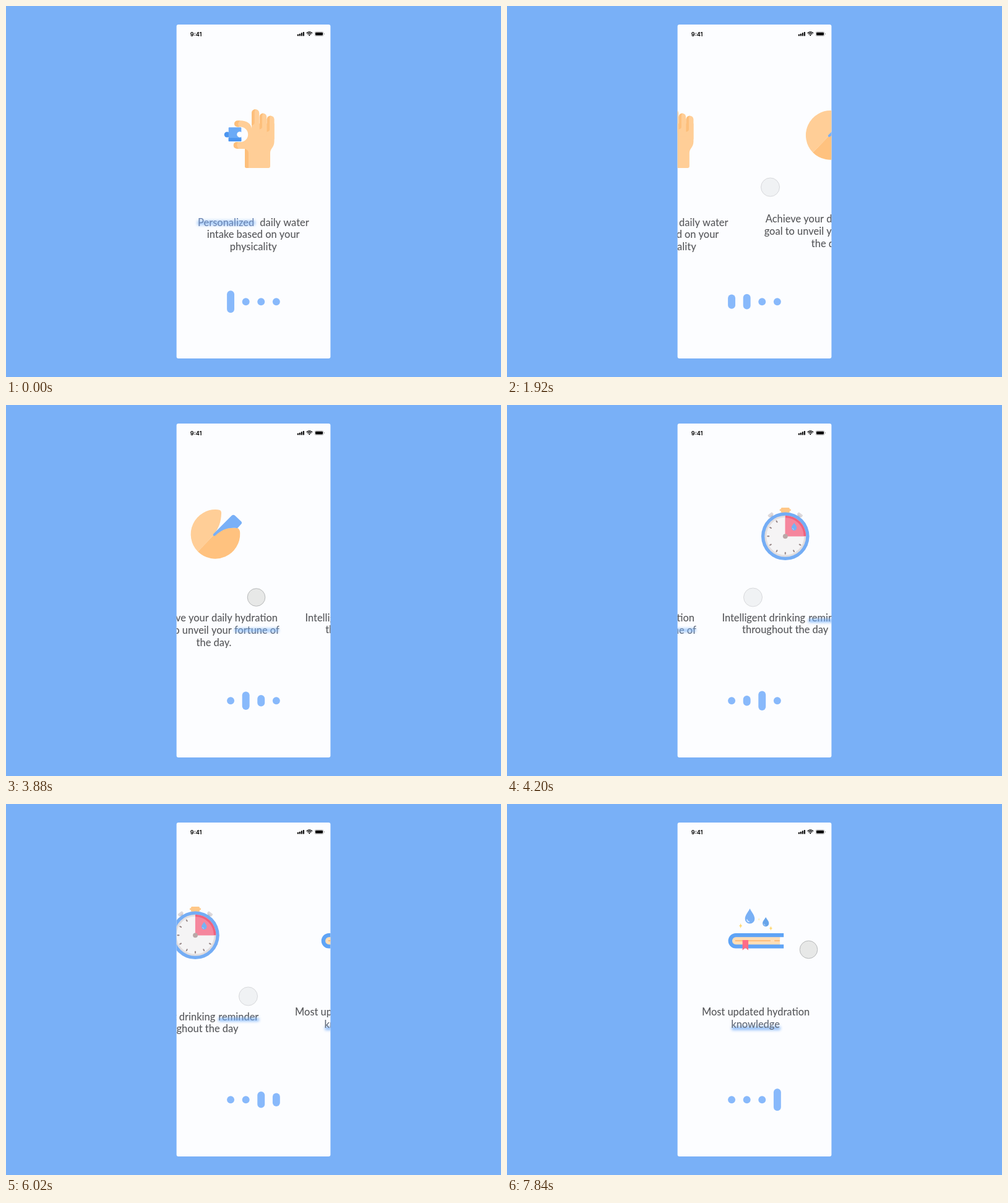
An HTML page with a canvas for the animation above (8000 ms loop, 800x600 px).

```html
<!DOCTYPE html>
<html lang="en">
<head>
<meta charset="utf-8">
<title>Hydration onboarding</title>
<style>
html, body { margin: 0; width: 100%; height: 100%; overflow: hidden; background: #79b0f7; }
canvas { display: block; }
</style>
</head>
<body>
<canvas id="stage" width="800" height="600"></canvas>
<script>
const ctx = document.getElementById('stage').getContext('2d');
const LOOP = 8000, STEP = 249.5, SNAP_END = 820;
const LIGHT = '#ffce97', DARK = '#fdbf7b', BLUE = '#79b0f7';

const linear = p => p;
const easeOut = p => 1 - Math.pow(1 - p, 2.5);
const quadOut = p => p * (2 - p);
const easeInOut = p => (1 - Math.cos(Math.PI * p)) / 2;

// start, drag time, drag distance
const swipes = [[1600, 190, 62.5], [3700, 200, 74], [5800, 200, 86.5]];
const presses = [[1420, 1790], [3520, 3900], [5600, 6000], [7840, 8000]];

// time, x, y, easing towards this point
const route = [
  [400, 501, 14], [640, 501, 202.5, easeOut],
  [900, 501, 202.5], [1220, 488, 294, easeInOut],
  [1600, 488, 294], [1790, 425.5, 293, linear],
  [2420, 425.5, 293], [3040, 471.5, 311.5, easeOut],
  [3700, 471.5, 311.5], [3900, 397.5, 311, linear],
  [4520, 397.5, 311], [5180, 478, 311.5, easeOut],
  [5800, 478, 311.5], [6000, 391.5, 311, linear],
  [6720, 391.5, 311], [7300, 483, 222.5, easeInOut],
  [7540, 484.5, 232, easeInOut], [7660, 487.5, 235.5, quadOut]
];

function scrollAt(t) {
  let s = 0;
  for (const [start, drag, dist] of swipes) {
    const d = t - start;
    if (d <= 0) break;
    if (d < drag) s += dist * d / drag;
    else s += dist + (STEP - dist) * quadOut(Math.min(1, (d - drag) / (SNAP_END - drag)));
  }
  return s;
}

function cursorAt(t) {
  for (let i = 1; i < route.length; i++) {
    const [t1, x1, y1, ease = linear] = route[i];
    if (t < t1) {
      const [t0, x0, y0] = route[i - 1];
      const p = ease(Math.max(0, (t - t0) / (t1 - t0)));
      return [x0 + (x1 - x0) * p, y0 + (y1 - y0) * p];
    }
  }
  return route[route.length - 1].slice(1, 3);
}

function fill(d, color) {
  ctx.fillStyle = color;
  ctx.fill(new Path2D(d));
}

function box(x, y, w, h, r, color) {
  ctx.fillStyle = color;
  ctx.beginPath();
  ctx.roundRect(x, y, w, h, r);
  ctx.fill();
}

function disc(x, y, r, color) {
  ctx.fillStyle = color;
  ctx.beginPath();
  ctx.arc(x, y, r, 0, Math.PI * 2);
  ctx.fill();
}

function label(str, x, y, color = '#58595c') {
  ctx.font = '500 16.4px Lato, "Open Sans", sans-serif';
  ctx.textAlign = 'center';
  ctx.fillStyle = color;
  ctx.fillText(str, x, y);
}

function marker(x, y, w, h, alpha) {
  ctx.save();
  ctx.globalAlpha = alpha;
  ctx.filter = 'blur(2px)';
  box(x, y, w, h, 2, '#72adf8');
  ctx.restore();
}

function drop(x, top, w, h, color, shine) {
  const r = w / 2, cy = top + h - r;
  ctx.fillStyle = color;
  ctx.beginPath();
  ctx.moveTo(x, top);
  ctx.bezierCurveTo(x + r * .35, top + h * .25, x + r, cy - r * .8, x + r, cy);
  ctx.arc(x, cy, r, 0, Math.PI);
  ctx.bezierCurveTo(x - r, cy - r * .8, x - r * .35, top + h * .25, x, top);
  ctx.fill();
  ctx.strokeStyle = shine;
  ctx.lineWidth = w * .1;
  ctx.beginPath();
  ctx.arc(x, cy, r * .62, Math.PI * .55, Math.PI * .95);
  ctx.stroke();
}

function spark(x, y, r, color) {
  const k = r * .25;
  fill(`M${x} ${y - r}L${x + k} ${y - k}L${x + r * .7} ${y}L${x + k} ${y + k}L${x} ${y + r}` +
    `L${x - k} ${y + k}L${x - r * .7} ${y}L${x - k} ${y - k}Z`, color);
}

function hand() {
  fill('M397 190H433.6V219C433.6 229 427 230 427 238V259a3 3 0 0 1-3 3H389a3 3 0 0 1-3-3V231' +
    'C380 231.2 375 231 372 230.4a5.3 5.3 0 0 1 0-10.4H380A12.3 12.3 0 0 0 380 195.5H374' +
    'a5 5 0 0 1 0-10C387 184 396 189 397 198Z', LIGHT);
  for (const [x, y, w] of [[397, 167, 12.3], [409.8, 173.5, 11.4], [421.6, 177.5, 12]]) {
    const r = w / 2;
    box(x, y, w, 38, [r, r, 0, 0], LIGHT);
    fill(`M${x} ${y + r}a${r} ${r} 0 0 1 ${r} ${-r}q-1.5 2 -1.5 6V${y + 22}q0 3 ${1.5 - r} 4Z`, DARK);
  }
  fill('M374 195.5a5 5 0 0 1 0-10h4q-5 5-1 10Z', DARK);
  fill('M372 230.4a5.3 5.3 0 0 1 0-10.4h3q-4 5 1 11Z', DARK);
  fill('M386 231q6 1 6 8V262H389a3 3 0 0 1-3-3Z', DARK);
  disc(357.3, 208, 4.6, '#4b95f0');
  box(359.7, 196.3, 20.6, 22.8, 1.2, '#6baaf6');
  box(359.7, 213.6, 20.6, 5.5, [0, 0, 1.2, 1.2], '#4b95f0');
  disc(377.8, 207.8, 4.6, '#fcfdff');
}

function cookie() {
  fill('M377 237A40 40 0 0 1 409 169.2Q415.5 169.5 415 175C414.5 190 411 198 403 210Z', LIGHT);
  fill('M377 237L403 210C413 200 424 198 440 198.8Q445 199.5 445.2 207A40 40 0 0 1 377 237Z', '#ffc27f');
  fill('M402.2 208.4L431.8 178.8Q434.3 176.6 436.7 178.6L447 188.3Q449 190.4 447.2 192.5L441 199.2' +
    'C425 197.5 416 201.5 406 210.5Q403.5 212.8 402 211.2Q401 209.8 402.2 208.4Z', BLUE);
}

function timer() {
  const x = 403.3, y = 212.3;
  for (const side of [-1, 1]) {
    ctx.save();
    ctx.translate(x + side * 23, 178.5);
    ctx.rotate(side * .66);
    box(-4.5, -3.5, 9, 5, 1.2, '#dcd8db');
    box(-2.5, 0, 5, 6, 0, '#cfc9cd');
    ctx.restore();
  }
  box(399, 172, 9, 5, 0, '#f3b56f');
  box(396.3, 166, 14, 8, 1.5, '#ffc787');
  box(394.2, 168.4, 18.2, 2.8, 1, '#ffc787');
  disc(x, y, 38.8, '#74adf5');
  disc(x, y, 33.5, '#e2dedf');
  disc(x, y, 30.5, '#f5f4f5');
  for (const [r, c] of [[33.5, '#f0627e'], [30, '#f5869d']]) {
    ctx.fillStyle = c;
    ctx.beginPath();
    ctx.moveTo(x, y);
    ctx.arc(x, y, r, -Math.PI / 2, 0);
    ctx.fill();
  }
  for (let i = 4; i < 12; i++) {
    ctx.save();
    ctx.translate(x, y);
    ctx.rotate(i * Math.PI / 6);
    box(-1, -29.5, 2, 4, .8, '#978787');
    ctx.restore();
  }
  disc(x, y, 3.9, '#b9a8a8');
  drop(417.6, 190.5, 8.4, 12.5, '#76b2f4', '#c9e3ff');
}

function book() {
  drop(392.5, 169, 15.6, 24.6, '#79b0f5', '#dcecff');
  drop(418.2, 183, 10.2, 15.2, '#68a5ea', '#b5d5fb');
  spark(377.6, 197, 4, '#ffd873');
  spark(407.2, 186.5, 2.6, '#ffeebf');
  spark(426.4, 201, 3.8, '#ffd873');
  fill('M447.2 209H369.8a12.25 12.25 0 0 0 0 24.5H447.2V227.3H441V215.2H447.2Z', '#5fa4f6');
  fill('M441.5 215.2H370a6 6 0 0 0 0 12.1H441.5Q440 221 441.5 215.2Z', '#ffdeb7');
  box(368.5, 220, 57.5, 2.3, 1, '#ffc07d');
  box(432, 220, 9, 2.3, 1, '#ffc07d');
  fill('M380.6 220H390V236.4L385.3 232.6L380.6 236.4Z', '#ff6c87');
}

const pages = [
  () => {
    hand();
    marker(309, 346.8, 94, 8, .55);
    label('Personalized', 355.6, 355.5, '#6c87b5');
    label('daily water', 450, 355.5);
    label('intake based on your', 399.6, 375.4);
    label('physicality', 399.8, 395.3);
  },
  () => {
    cookie();
    label('Achieve your daily hydration', 403.2, 350.3);
    label('goal to unveil your', 365, 370);
    label('fortune of', 472.3, 370, '#626a78');
    label('the day.', 403, 389.7);
    marker(436, 361.2, 72, 6, .6);
  },
  () => {
    timer();
    label('Intelligent drinking', 368.3, 349.6);
    label('reminder', 473.2, 349.6);
    label('throughout the day', 403.2, 369.3);
    marker(440.5, 346, 66, 5.5, .75);
  },
  () => {
    book();
    label('Most updated hydration', 402, 342.3);
    marker(363, 359.8, 79, 6, .75);
    label('knowledge', 401.6, 361.8, '#626a78');
  }
];

function statusBar() {
  ctx.font = '700 9px Inter, "Liberation Sans", sans-serif';
  ctx.textAlign = 'center';
  ctx.fillStyle = '#111';
  ctx.fillText('9:41', 307.1, 48.7);
  [2.7, 3.8, 5.2, 6.6].forEach((h, i) => box(470.9 + i * 3, 48.5 - h, 2.1, h, .5, '#0b0b0b'));
  ctx.strokeStyle = '#0b0b0b';
  ctx.lineWidth = 1.4;
  for (const r of [6.2, 3.9]) {
    ctx.beginPath();
    ctx.arc(490.3, 48.2, r, -Math.PI * .77, -Math.PI * .23);
    ctx.stroke();
  }
  fill('M490.3 48.6L488.6 46.7Q490.3 45.4 492 46.7Z', '#0b0b0b');
  ctx.strokeStyle = '#9b9b9b';
  ctx.lineWidth = .6;
  ctx.beginPath();
  ctx.roundRect(498.9, 41.7, 14.2, 6.9, 2);
  ctx.stroke();
  box(500, 42.7, 12, 4.9, 1.1, '#000');
  box(513.7, 44, .9, 2.3, .5, '#9b9b9b');
}

function cursor(t) {
  if (t < 400) return;
  const [x, y] = cursorAt(t);
  const down = presses.some(([a, b]) => t >= a && t < b);
  const r = down ? 14.3 : 15;
  disc(x, y, r, down ? 'rgba(215,215,212,.55)' : 'rgba(234,235,237,.6)');
  ctx.strokeStyle = down ? '#a9abad' : '#cfd0d3';
  ctx.lineWidth = .8;
  ctx.stroke();
}

function draw(t) {
  const s = scrollAt(t);
  ctx.fillStyle = BLUE;
  ctx.fillRect(0, 0, 800, 600);
  ctx.save();
  box(275.6, 30, 248.8, 540, 3, '#fcfdff');
  ctx.clip();
  pages.forEach((page, i) => {
    const dx = i * STEP - s;
    if (Math.abs(dx) >= STEP) return;
    ctx.save();
    ctx.translate(dx, 0);
    page();
    ctx.restore();
  });
  for (let i = 0; i < 4; i++) {
    const h = 12 + 24 * Math.max(0, 1 - Math.abs(s / STEP - i));
    box(357.1 + i * 24.6, 478.2 - h / 2, 11.9, h, 5.95, '#88b9fb');
  }
  statusBar();
  cursor(t);
  ctx.restore();
}

const begin = performance.now();
function tick() {
  draw((performance.now() - begin) % LOOP);
  requestAnimationFrame(tick);
}
tick();
</script>
</body>
</html>
```
